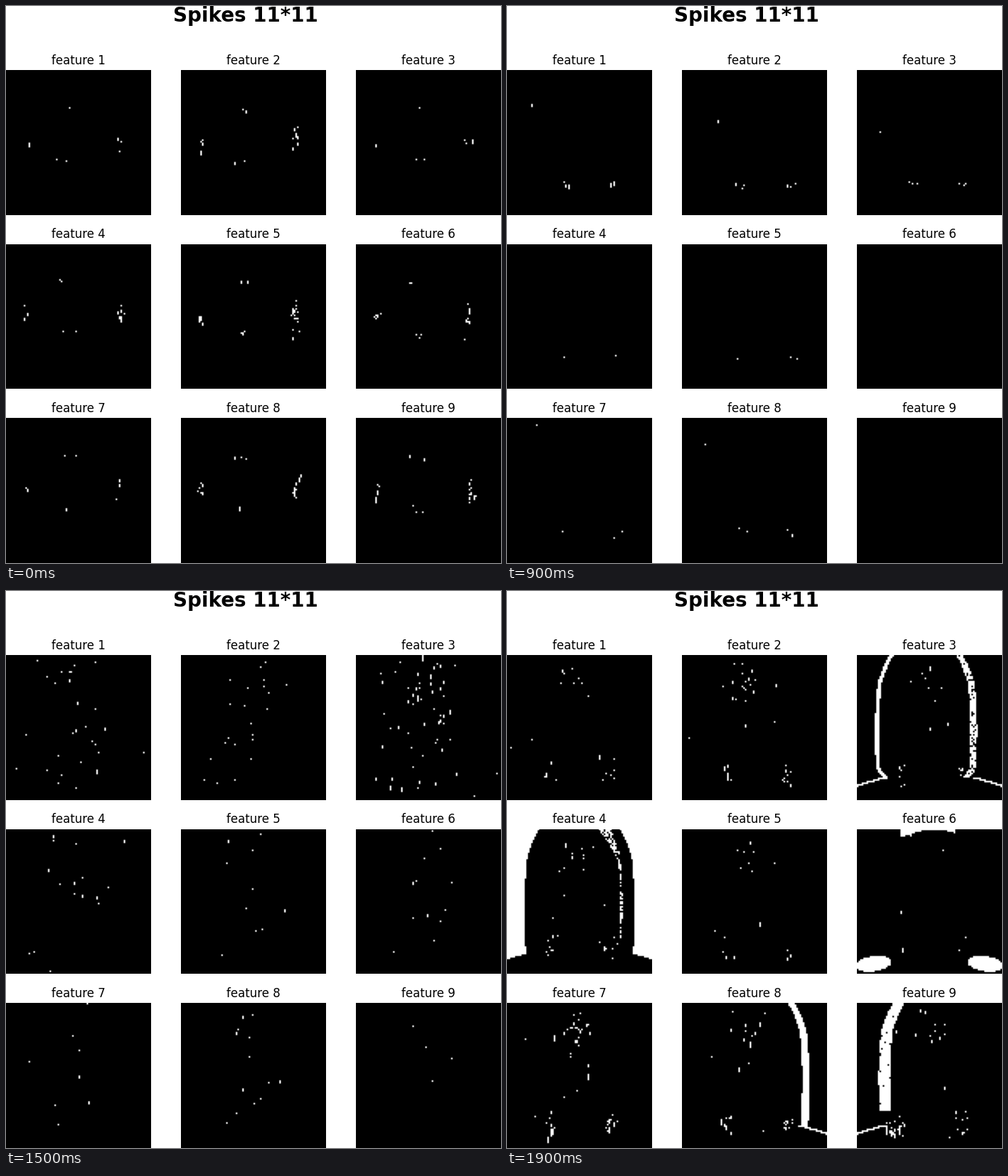
A matplotlib script that plays this animation: 696 px wide and 783 px high, repeating every 2 s.

```python
import numpy as np
import matplotlib.pyplot as plt
from matplotlib.animation import FuncAnimation

W, H, DPI = 696, 783, 100
SIDE, DX, DY, TOP = 203.82, 246.18, 244.6, 90
N = 90                      # cells per panel side
MID = N / 2
FRAMES, STEP = 20, 100
HEAD, ARCS = FRAMES - 1, 3  # steps with the head and with the side arcs

Y, X = np.mgrid[:N, :N] + .5

# step: (spikes per panel, hot spots as (x, y, spread x, spread y, share))
scenes = {
    0: ((11, 25, 10, 22, 40, 25, 13, 32, 32),
        [(13, 45, 1.3, 2.5, .26), (38, 24, 4, 1.5, .11),
         (71, 44, 1.5, 5, .52), (37, 56, 3, 1.5, .11)]),
    3: ((25, 6, 8, 4, 5, 24, 15, 9, 14),
        [(49, 20, 4, 1.5, .6), (22, 20, 6, 2, .25), (45, 38, 20, 10, .15)]),
    5: ((33, 32, 13, 20, 34, 17, 32, 20, 18),
        [(42, 22, 6, 6, .4), (14, 42, 3, 10, .18), (37, 56, 3, 3, .2),
         (70, 45, 3, 8, .12), (60, 82, 10, 4, .1)]),
    9: ((13, 10, 7, 3, 4, 0, 4, 5, 0),
        [(37, 71, 2, 1.5, .4), (69, 71, 2.5, 1.5, .45), (20, 40, 4, 24, .15)]),
    13: ((14, 6, 18, 5, 12, 10, 8, 7, 2),
         [(52, 48, 5, 7, .45), (50, 6, 10, 3, .25), (38, 50, 17, 18, .3)]),
    17: ((52, 38, 165, 40, 15, 17, 14, 27, 5),
         [(42, 15, 11, 8, .38), (50, 50, 17, 20, .47), (28, 78, 13, 6, .15)]),
    19: ((26, 52, 26, 36, 24, 9, 85, 52, 42),
         [(42, 17, 7, 6, .36), (27, 76, 2, 4, .25), (65, 76, 2, 4, .22),
          (42, 45, 16, 18, .17)]),
}


def scatter(grid, rng, n, x, y, sx, sy):
    """About n lit cells around (x, y), in short vertical runs."""
    while n > 0:
        i = int(np.clip(rng.normal(x, sx), 0, N - 1))
        j = int(np.clip(rng.normal(y, sy), 0, N - 1))
        run = min(n, rng.geometric(.65))
        grid[j:j + run, i] = 1
        n -= run


def draw_spots(grids, rng, step, fade=1):
    levels, spots = scenes[step]
    for grid, level in zip(grids, levels):
        for *spot, share in spots:
            n = int(level * share * fade + rng.random())
            scatter(grid, rng, n, *spot)


def paint(grid, mask, rng, density=1):
    grid[mask & (rng.random((N, N)) < density)] = 1


def draw_arcs(grids, rng, fade=1):
    def arc(panel, x0, bulge, top, density):
        bow = x0 + bulge * np.sin(np.pi * (Y - top) / (N - top))
        paint(grids[panel - 1], (abs(X - bow) < .9) & (Y > top), rng, density * fade)

    arc(2, .8, 3.4, 51, .75)
    arc(2, 89.5, -1.5, 58, .4)
    arc(4, 86, -3.8, 54, .65)
    arc(8, .3, 1, 63, .75)
    arc(8, 87.5, -3, 58, .6)
    arc(9, 4, 2.6, 58, .65)


def draw_head(grids, rng):
    half = np.interp(Y, [0, 7, 17, 28, 45, N], [25, 28.7, 32.3, 33.4, 34, 33.2])
    off = X - MID
    inset = half - abs(off)
    neck = np.clip((Y - 68) / 8, 0, 1) ** 2 * 5
    shoulder = 76.3 + .3 * np.maximum(0, abs(off) - 29)
    left, right = off < 0, off > 0
    line = (abs(Y - shoulder) < .65) & (abs(off) > 27)

    def band(depth, outer, inner, bottom):
        return (depth > outer) & (depth < inner) & (Y < bottom)

    paint(grids[2], left & band(inset - neck, .2, 2.8, 77), rng)
    paint(grids[2], right & band(inset - neck, 4.4, 8.5, 76), rng, .82)
    paint(grids[2], line, rng)

    paint(grids[3], (inset < 0) & (Y < shoulder), rng)
    crown = np.maximum(0, 5 - Y / 4)
    paint(grids[3], right & band(inset, 7.3 - crown / 3, 8.8 + crown, 68), rng, .65)

    arch = np.minimum(5, .8 + .012 * (X - 48) ** 2)
    paint(grids[5], (Y < arch) & (X > 27) & (X < 61), rng)
    u = abs(off) - 34.5
    paint(grids[5], (u / 11) ** 2 + ((Y - 83.8 - .12 * u) / 4.8) ** 2 < 1, rng)

    paint(grids[7], right & (band(inset, 0, 4.3, 77) | line), rng)
    paint(grids[8], left & band(inset, 2.4, 9.6, 67), rng, .97)
    paint(grids[8], left & line, rng)
    scatter(grids[8], rng, 30, 22, 79, 2, 3)


def grids_at(k):
    rng = np.random.default_rng(k + 1)
    grids = np.zeros((9, N, N))
    if k in scenes:
        draw_spots(grids, rng, k)
        if k == ARCS:
            draw_arcs(grids, rng)
        if k == HEAD:
            draw_head(grids, rng)
        return grids
    # between two scenes, fade one out while the next fades in
    a = max(s for s in scenes if s < k)
    b = min(s for s in scenes if s > k)
    t = (k - a) / (b - a)
    for step, fade in ((a, 1 - t), (b, t)):
        draw_spots(grids, rng, step, fade)
        if step == ARCS:
            draw_arcs(grids, rng, fade ** 2)
    return grids


plt.rcParams["font.family"] = "DejaVu Sans"
fig = plt.figure(figsize=(W / DPI, H / DPI), dpi=DPI, facecolor="white")
fig.text(336.84 / W, 1, "Spikes 11*11", size=20, weight="bold", ha="center", va="top")

images = []
for p in range(9):
    x, y = p % 3 * DX, TOP + p // 3 * DY
    ax = fig.add_axes([x / W, 1 - (y + SIDE) / H, SIDE / W, SIDE / H])
    ax.set_title(f"feature {p + 1}", fontsize=12)
    ax.axis("off")
    images.append(ax.imshow(np.zeros((N, N)), cmap="gray", vmin=0, vmax=1))


def update(k):
    for image, grid in zip(images, grids_at(k)):
        image.set_data(grid)
    return images


anim = FuncAnimation(fig, update, frames=FRAMES, interval=STEP, repeat=True,
                     repeat_delay=0, blit=False)
plt.show()
```
